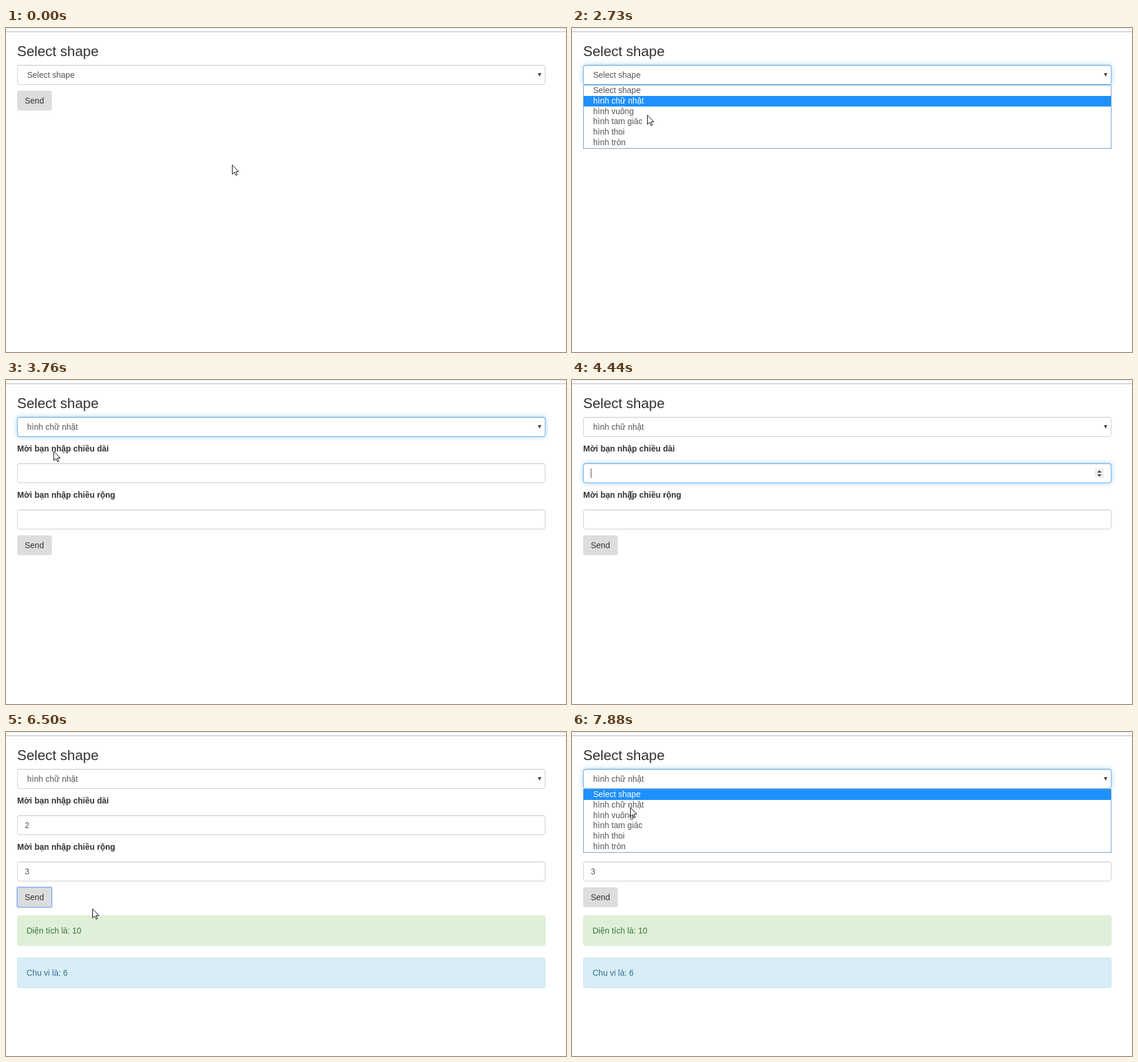
Write an HTML page that moves like this. It is 954 by 553 pixels and loops after 8 s.

```html
<!DOCTYPE html>
<html lang="vi">
<head>
<meta charset="utf-8">
<title>Select shape</title>
<style>
  html, body { margin: 0; width: 100%; height: 100%; overflow: hidden; background: #fff; }
  body { position: relative; color: #333; font: 14px/20px "Liberation Sans", Arial, sans-serif; }
  body *, .field::after { position: absolute; box-sizing: border-box; white-space: pre; }
  [hidden] { display: none !important; }
  .strip { left: 0; top: 0; width: 954px; height: 7px; border-top: 2px solid #f1f1f1; border-bottom: 1px solid #b0b0b0; }
  h3 { left: 19px; top: 27px; margin: 0; font-size: 24px; font-weight: 400; line-height: 26px; }
  label { left: 19px; font-weight: 700; }
  .field {
    left: 19px; width: 900px; height: 34px; border: 1px solid #ccc; border-radius: 4px;
    background: #fff; color: #555; box-shadow: inset 0 1px 1px rgba(0,0,0,.075);
  }
  .field::after {
    content: ""; inset: -1px; border: 1px solid #66afe9; border-radius: 4px; opacity: var(--glow, 0);
    box-shadow: inset 0 1px 1px rgba(0,0,0,.075), 0 0 8px rgba(102,175,233,.6);
  }
  .field span { left: 12px; top: 6px; }
  #pick span { left: 16px; }
  #pick svg { left: 885px; top: 12px; }
  .caret { top: 8px; width: 1px; height: 16px; background: #444; }
  .spin { left: 871px; top: 8px; }
  #send { left: 19px; width: 59px; height: 34px; padding: 7px 13px; border-radius: 4px; background: #ddd; }
  #send.focus { border-radius: 2px; box-shadow: 0 0 0 1px #8fb4f5, inset 0 0 0 1px #9ebcf0; }
  #send.press { box-shadow: 0 0 0 1px #8fb4f5, inset 0 0 0 1px #9ebcf0, inset 0 3px 5px rgba(0,0,0,.125); }
  .alert { left: 19px; width: 900px; height: 52px; padding: 15px; border: 1px solid; border-radius: 4px; }
  .area { top: 313px; color: #3c763d; background: #dff0d8; border-color: #d6e9c6; }
  .rim { top: 385px; color: #31708f; background: #d9edf7; border-color: #bce8f1; }
  #menu { left: 19px; top: 97px; width: 900px; height: 109px; border: 1px solid #6a9bd0; background: #fff; color: #555; }
  #bar { left: 0; width: 898px; height: 18px; background: #1e90ff; }
  #menu span { left: 16px; line-height: 18px; }
  #menu .on { color: #fff; }
  #mouse { left: 0; top: 0; }
  #mouse svg { overflow: visible; }
  #spot { width: 24px; height: 24px; border-radius: 50%; background: rgba(255,255,0,.52); }
</style>
</head>
<body>
<div class="strip"></div>
<h3>Select shape</h3>
<div class="field" id="pick" style="top:63px"><span></span>
  <svg width="8" height="8"><path d="M1 1H7L4 7Z" fill="#444"/></svg>
</div>
<div id="form">
  <label style="top:107px">Mời bạn nhập chiều dài</label>
  <div class="field" id="long" style="top:142px"></div>
  <label style="top:186px">Mời bạn nhập chiều rộng</label>
  <div class="field" id="wide" style="top:221px"></div>
</div>
<div id="send">Send</div>
<div id="result">
  <div class="alert area">Diện tích là: 10</div>
  <div class="alert rim">Chu vi là: 6</div>
</div>
<div id="menu"><div id="bar"></div></div>
<div id="mouse">
  <svg id="arrow" width="12" height="19"><path d="M.5.8V16.6L4.2 13.1L6.7 18.5L8.9 17.5L6.6 12.2H11.3Z" fill="#fff" stroke="#000"/></svg>
  <svg id="beam" width="7" height="16"><path d="M0 1.5H2.5L3.5 2.5L4.5 1.5H7M0 14.5H2.5L3.5 13.5L4.5 14.5H7M3.5 2V14" fill="none" stroke="#000"/></svg>
  <div id="spot"></div>
</div>
<script>
const $ = id => document.getElementById(id);
const LOOP = 8000;
const shapes = ["Select shape", "hình chữ nhật", "hình vuông", "hình tam giác", "hình thoi", "hình tròn"];
const rowTop = i => Math.round(17.8 * i);

const items = shapes.map((name, i) => {
  const el = document.createElement("span");
  el.textContent = name;
  el.style.top = rowTop(i) - 1 + "px";
  $("menu").append(el);
  return el;
});

for (const id of ["long", "wide"]) {
  $(id).innerHTML = `<span></span><div class="caret"></div>
    <svg class="spin" width="15" height="16"><rect width="15" height="16" fill="#eee"/>
    <path d="M3.5 7H11.5L7.5 3ZM3.5 10H11.5L7.5 14Z" fill="#505050"/></svg>`;
}

// Each step changes only the listed parts of the state.
const steps = [
  [0, { x: 377, y: 213, beam: false, click: false, row: -1, shape: 0, glow: 0,
        long: { text: "", glow: 0 }, wide: { text: "", glow: 0 }, send: "", done: false }],
  [330, { x: 165, y: 147 }],
  [670, { x: 148, y: 132 }],
  [1010, { x: 108, y: 99 }],
  [1360, { x: 106, y: 89 }],
  [1690, { y: 85 }],
  [2040, { x: 109, y: 80, click: true }],
  [2380, { click: false, row: 0, glow: 1 }],
  [2730, { x: 120, y: 128, row: 1 }],
  [3080, { x: 128, y: 137, row: 2, click: true }],
  [3410, { x: 126, y: 129, row: 1 }],
  [3760, { x: 73, y: 101, row: -1, shape: 1, click: false }],
  [4110, { x: 86, y: 152, beam: true, click: true, glow: .5, long: { text: "", glow: .15, caret: true } }],
  [4440, { x: 89, y: 149, click: false, glow: 0, long: { text: "", glow: 1, caret: true } }],
  [4790, { y: 152, long: { text: "", glow: 1 } }],
  [5120, { x: 84, y: 208, beam: false, long: { text: "2", glow: 1, caret: true } }],
  [5470, { x: 80, y: 224, beam: true, long: { text: "2", glow: 0 }, wide: { text: "", glow: 1, caret: true } }],
  [5820, { x: 72, y: 259, beam: false, wide: { text: "3", glow: 1, caret: true } }],
  [6160, { x: 60, y: 285, click: true, wide: { text: "3", glow: 0 }, send: "press" }],
  [6500, { x: 139, y: 281, click: false, send: "focus", done: true }],
  [6830, { x: 149, y: 203 }],
  [7180, { x: 95, y: 103 }],
  [7540, { x: 94, y: 87, click: true, row: 1, glow: .85, send: "" }],
  [7880, { x: 91, y: 108, click: false, row: 0, glow: 1 }]
];

function showInput(id, { text, glow, caret }) {
  const el = $(id);
  el.style.setProperty("--glow", glow);
  el.querySelector("span").textContent = text;
  const bar = el.querySelector(".caret");
  bar.hidden = !caret;
  bar.style.left = 12 + 8 * text.length + "px";
  el.querySelector(".spin").style.display = glow ? "" : "none";
}

function show(s) {
  $("pick").style.setProperty("--glow", s.glow);
  $("pick").querySelector("span").textContent = shapes[s.shape];
  $("form").hidden = !s.shape;
  showInput("long", s.long);
  showInput("wide", s.wide);
  $("send").style.top = (s.shape ? 265 : 107) + "px";
  $("send").className = s.send;
  $("result").hidden = !s.done;
  $("menu").hidden = s.row < 0;
  $("bar").style.top = rowTop(Math.max(s.row, 0)) + "px";
  items.forEach((el, i) => el.classList.toggle("on", i === s.row));
  $("mouse").style.transform = `translate(${s.x}px, ${s.y}px)`;
  $("arrow").style.display = s.beam ? "none" : "";
  $("beam").style.display = s.beam ? "" : "none";
  $("spot").hidden = !s.click;
  $("spot").style.left = (s.beam ? -8 : -12) + "px";
  $("spot").style.top = (s.beam ? -4 : -12) + "px";
}

let start, last = -1;
function tick(now) {
  start ??= now;
  const t = (now - start) % LOOP;
  const past = steps.filter(([at]) => at <= t);
  if (past.length !== last) {
    last = past.length;
    show(Object.assign({}, ...past.map(([, change]) => change)));
  }
  requestAnimationFrame(tick);
}
show(steps[0][1]);
requestAnimationFrame(tick);
</script>
</body>
</html>
```
